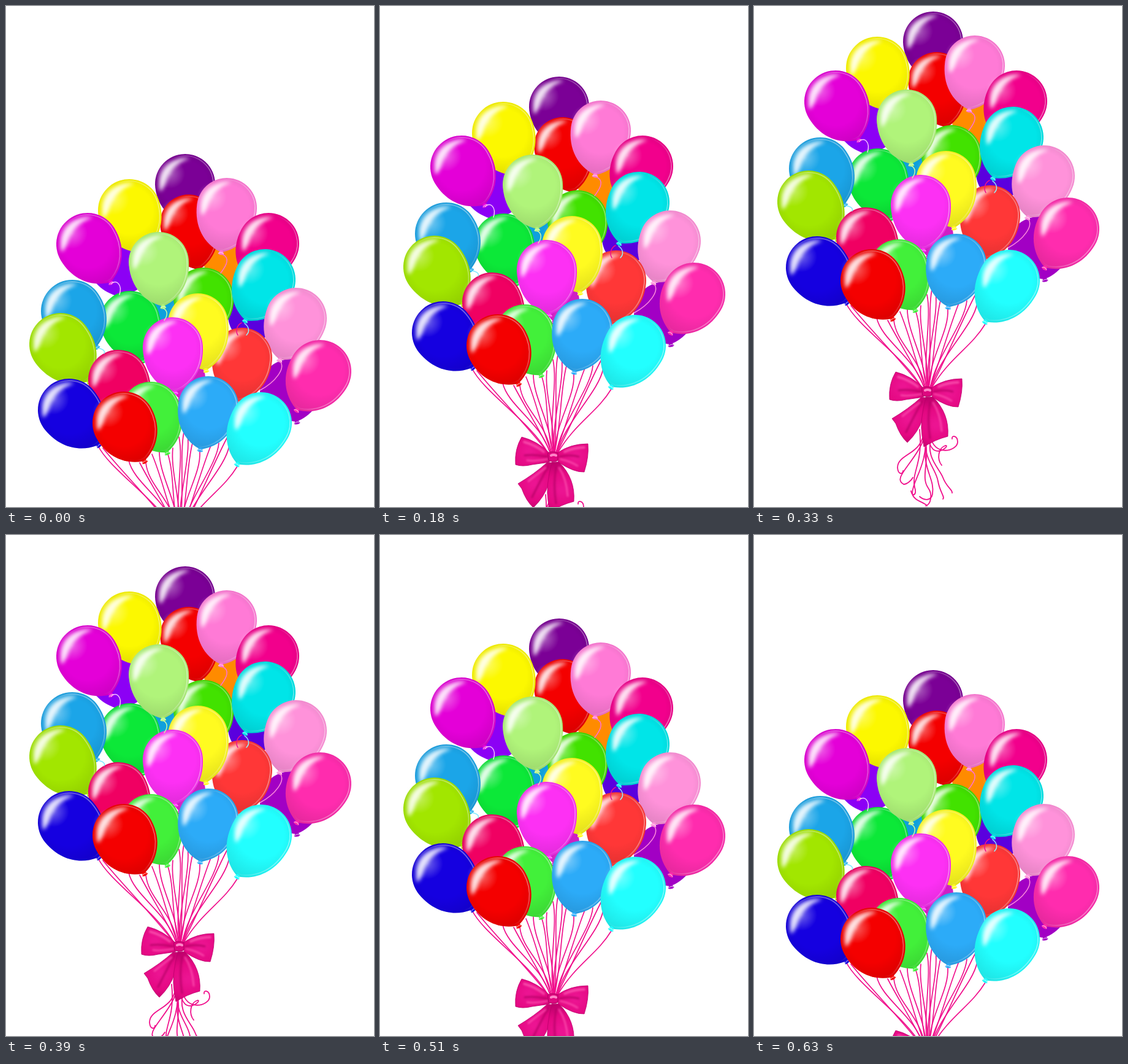
An HTML page with a canvas that plays this animation: 600 by 816 pixels, repeating every 660 ms.

```html
<!DOCTYPE html>
<html>
<head>
<meta charset="utf-8">
<title>Balloons</title>
<style>
html, body { margin: 0; width: 100%; height: 100%; overflow: hidden; background: #fff; }
canvas { display: block; }
</style>
</head>
<body>
<canvas id="stage" width="600" height="816"></canvas>
<script>
const W = 600, H = 816;
const STEP = 30, STEPS = 22, RISE = 21.1;
const STRING = '#f0108c';

// colour, centre x, centre y, radius, tip x, tip y (back to front)
const hiddenRow = [
  ['#ff8b00', 368, 184, 45, 360, 234],
  ['#8c00f5', 186, 193, 49, 182, 240],
  ['#0fa0dc', 252, 245, 32, 255, 288],
  ['#5a00de', 402, 268, 40, 396, 318],
  ['#a200c4', 464, 393, 50, 474, 444],
  ['#cf1fc4', 298, 373, 27, 284, 408]
];
const backRow = [
  ['#7b0096', 292, 58, 49, 300, 122],
  ['#f40000', 298, 122, 47, 315, 196],
  ['#fcf800', 201, 101, 51, 222, 168],
  ['#ff7ad6', 360, 97, 49, 351, 168],
  ['#f2008c', 428, 155, 50, 396, 215],
  ['#e400d8', 133, 156, 51, 170, 217],
  ['#42e200', 322, 243, 49, 330, 305]
];
const frontRow = [
  ['#00e5e8', 422, 214, 50, 391, 279],
  ['#0ce838', 202, 281, 49, 222, 345],
  ['#b0f47a', 249, 185, 49, 256, 256],
  ['#ff92da', 473, 277, 50, 447, 343],
  ['#1ba5e8', 108, 265, 51, 147, 322],
  ['#ff3737', 385, 341, 49, 378, 411],
  ['#fffb20', 313, 285, 49, 326, 360],
  ['#a2e600', 89, 319, 51, 134, 378],
  ['#f00062', 183, 377, 49, 214, 440],
  ['#fd30f4', 272, 324, 49, 276, 396],
  ['#ff2cae', 512, 363, 51, 475, 425],
  ['#1500e0', 103, 426, 51, 150, 482],
  ['#42f03a', 236, 428, 48, 262, 494],
  ['#f40000', 192, 447, 51, 225, 508],
  ['#2cabf8', 330, 420, 49, 317, 489],
  ['#22ffff', 416, 447, 50, 378, 513]
];

// where each string leaves the bunch: x, y
const stringStarts = [
  [150, 484], [158, 488], [200, 508], [218, 512], [228, 512], [238, 498], [250, 494],
  [264, 498], [272, 488], [282, 470], [290, 462], [296, 466], [304, 480], [316, 494],
  [334, 484], [347, 480], [361, 470], [364, 484], [377, 518]
];

const tailStrings = [
  'M277 690C276 732 234 728 234 752C235 764 243 763 243 757',
  'M282 690C270 740 222 768 244 779C250 779 257 772 259 768',
  'M270 690C276 745 256 760 262 784C266 797 258 800 256 790',
  'M280 690C284 750 258 772 258 794C260 806 278 808 282 814',
  'M286 690C266 750 296 765 291 795C289 806 278 806 270 799',
  'M284 690C270 735 296 750 300 774C303 792 312 800 308 803',
  'M290 700C278 735 302 752 308 768C314 784 324 788 323 793',
  'M276 690C290 740 270 765 284 785C292 796 288 812 280 814',
  'M288 700C292 735 332 725 332 710C332 700 322 698 323 705',
  'M284 700C288 745 322 715 312 716C300 720 298 738 306 748'
];

const looseStrings = [
  ['#ff70d4', 'M352 172C366 178 360 190 350 203'],
  ['#f7c6ff', 'M171 221C180 212 190 222 185 238'],
  ['#8ff4ff', 'M389 285C396 290 398 298 392 304'],
  ['#c8f7a8', 'M256 260C264 264 264 272 258 280'],
  ['#ff8cdc', 'M447 347C456 358 440 380 414 394'],
  ['#7fe9ff', 'M148 325C158 326 162 330 160 334'],
  ['#f0108c', 'M384 284C376 288 374 298 378 304']
];

const bowParts = [
  ['M272 638Q252 656 225 672L231 680Q238 700 250 711Q268 694 275 672L282 638Z', 252, 672],
  ['M280 637Q270 676 274 700L277 718Q296 706 316 701Q319 664 292 637Z', 297, 682],
  ['M276 622Q256 602 231 596Q219 616 221 641Q232 645 248 641L276 637Z', 243, 620],
  ['M289 622Q310 607 339 607Q341 628 333 653Q316 654 291 637Z', 319, 628]
];

const bowFolds = [
  'M272 628Q252 624 236 626', 'M273 632Q250 636 240 634',
  'M293 628Q310 624 324 628', 'M294 632Q312 636 322 643',
  'M274 644Q262 666 248 694', 'M270 646Q252 660 242 668',
  'M287 645Q282 674 287 704', 'M292 646Q304 664 306 692'
];

function line(g, path, colour, width) {
  g.strokeStyle = colour;
  g.lineWidth = width;
  g.stroke(new Path2D(path));
}

function eggPath(r, len) {
  const p = new Path2D();
  p.arc(0, 0, r, Math.PI, 0);
  p.bezierCurveTo(r, len * 0.53, r * 0.58, len * 0.87, r * 0.07, len);
  p.lineTo(-r * 0.07, len);
  p.bezierCurveTo(-r * 0.58, len * 0.87, -r, len * 0.53, -r, 0);
  return p;
}

function drawKnot(g, colour, len) {
  g.fillStyle = colour;
  g.beginPath();
  g.moveTo(-2, len - 2);
  g.lineTo(2, len - 2);
  g.lineTo(5, len + 4);
  g.quadraticCurveTo(0, len + 7, -5, len + 4);
  g.fill();
  line(g, `M-4 ${len + 3}Q0 ${len} 4 ${len + 3}`, 'rgba(255,255,255,.65)', 1);
}

function drawShine(g, r) {
  const glow = g.createRadialGradient(-r * 0.5, -r * 0.35, 0, -r * 0.5, -r * 0.35, r * 0.5);
  glow.addColorStop(0, 'rgba(255,255,255,.38)');
  glow.addColorStop(1, 'rgba(255,255,255,0)');
  g.fillStyle = glow;
  g.fillRect(-r, -r, r, r * 1.3);

  g.save();
  g.filter = 'blur(3px)';
  g.fillStyle = 'rgba(255,255,255,.85)';
  g.beginPath();
  g.arc(0, 0, r * 0.87, 2.85, 4.9);
  g.quadraticCurveTo(-r * 0.42, -r * 0.66, -r * 0.6, -r * 0.16);
  g.quadraticCurveTo(-r * 0.68, r * 0.14, -r * 0.83, r * 0.25);
  g.fill();
  g.restore();
}

function drawBalloon(g, [colour, x, y, r, tipX, tipY], glossy) {
  const dx = tipX - x, dy = tipY - y;
  const len = Math.hypot(dx, dy);
  const egg = eggPath(r, len);

  g.save();
  g.translate(x, y);
  g.save();
  g.rotate(Math.atan2(dy, dx) - Math.PI / 2);
  g.fillStyle = colour;
  g.fill(egg);

  if (glossy) {
    const shade = g.createRadialGradient(0, 0, r * 0.75, 0, len * 0.1, len * 1.05);
    shade.addColorStop(0, 'rgba(0,0,0,0)');
    shade.addColorStop(1, 'rgba(0,0,0,.14)');
    g.fillStyle = shade;
    g.fill(egg);

    const rim = g.createLinearGradient(-r * 0.2, 0, r, 0);
    rim.addColorStop(0, 'rgba(255,255,255,0)');
    rim.addColorStop(1, 'rgba(255,255,255,.4)');
    g.strokeStyle = rim;
    g.lineWidth = 1.8;
    g.stroke(eggPath(r * 0.94, len * 0.95));
  }
  drawKnot(g, colour, len);
  g.restore();

  if (glossy) drawShine(g, r);
  g.restore();
}

function drawStrings(g) {
  stringStarts.forEach(([x, y], i) => {
    const side = x - 283;
    const sway = i % 2 ? 8 : -6;
    line(g, `M${x} ${y}C${x - side * 0.18 + sway} ${y + 38} ` +
      `${283 + side * 0.32 - sway} 572 ${283 + side * 0.07} 622`, STRING, 1.7);
  });
}

function drawBow(g) {
  for (const [path, x, y] of bowParts) {
    const silk = g.createRadialGradient(x, y, 4, x, y, 46);
    silk.addColorStop(0, '#ec1492');
    silk.addColorStop(0.55, '#e40882');
    silk.addColorStop(1, '#bc006a');
    g.fillStyle = silk;
    g.fill(new Path2D(path));
    line(g, path, '#bd006c', 0.8);
  }
  g.save();
  g.filter = 'blur(1.5px)';
  g.globalAlpha = 0.7;
  bowFolds.forEach((path, i) => line(g, path, i % 2 ? '#ff58b4' : '#ae0062', 3));
  line(g, 'M235 604Q253 609 267 620', '#ff62b8', 4);
  line(g, 'M301 620Q317 613 333 613', '#ff62b8', 4);
  g.restore();
  g.fillStyle = '#dd087f';
  g.beginPath();
  g.roundRect(274, 620, 17, 16, 5);
  g.fill();
  line(g, 'M274 622Q282 618 290 622V634Q282 638 275 634Z', '#b00064', 1);
  line(g, 'M279 626Q283 624 287 626', '#ff86c8', 4);
}

function buildBunch() {
  const sheet = document.createElement('canvas');
  sheet.width = W;
  sheet.height = H;
  const g = sheet.getContext('2d');
  g.lineCap = g.lineJoin = 'round';
  drawStrings(g);
  tailStrings.forEach(path => line(g, path, STRING, 1.8));
  hiddenRow.forEach(b => drawBalloon(g, b, false));
  backRow.forEach(b => drawBalloon(g, b, true));
  frontRow.forEach(b => drawBalloon(g, b, true));
  looseStrings.forEach(([colour, path]) => line(g, path, colour, 1.5));
  drawBow(g);
  return sheet;
}

const ctx = document.getElementById('stage').getContext('2d');
const bunch = buildBunch();

function draw(now) {
  const step = Math.floor(now / STEP) % STEPS;
  const drop = Math.round(RISE * Math.abs(step - STEPS / 2));
  ctx.fillStyle = '#fff';
  ctx.fillRect(0, 0, W, H);
  ctx.drawImage(bunch, 0, drop);
}

let start;
function tick(now) {
  start ??= now;
  draw(now - start);
  requestAnimationFrame(tick);
}
draw(0);
requestAnimationFrame(tick);
</script>
</body>
</html>
```
